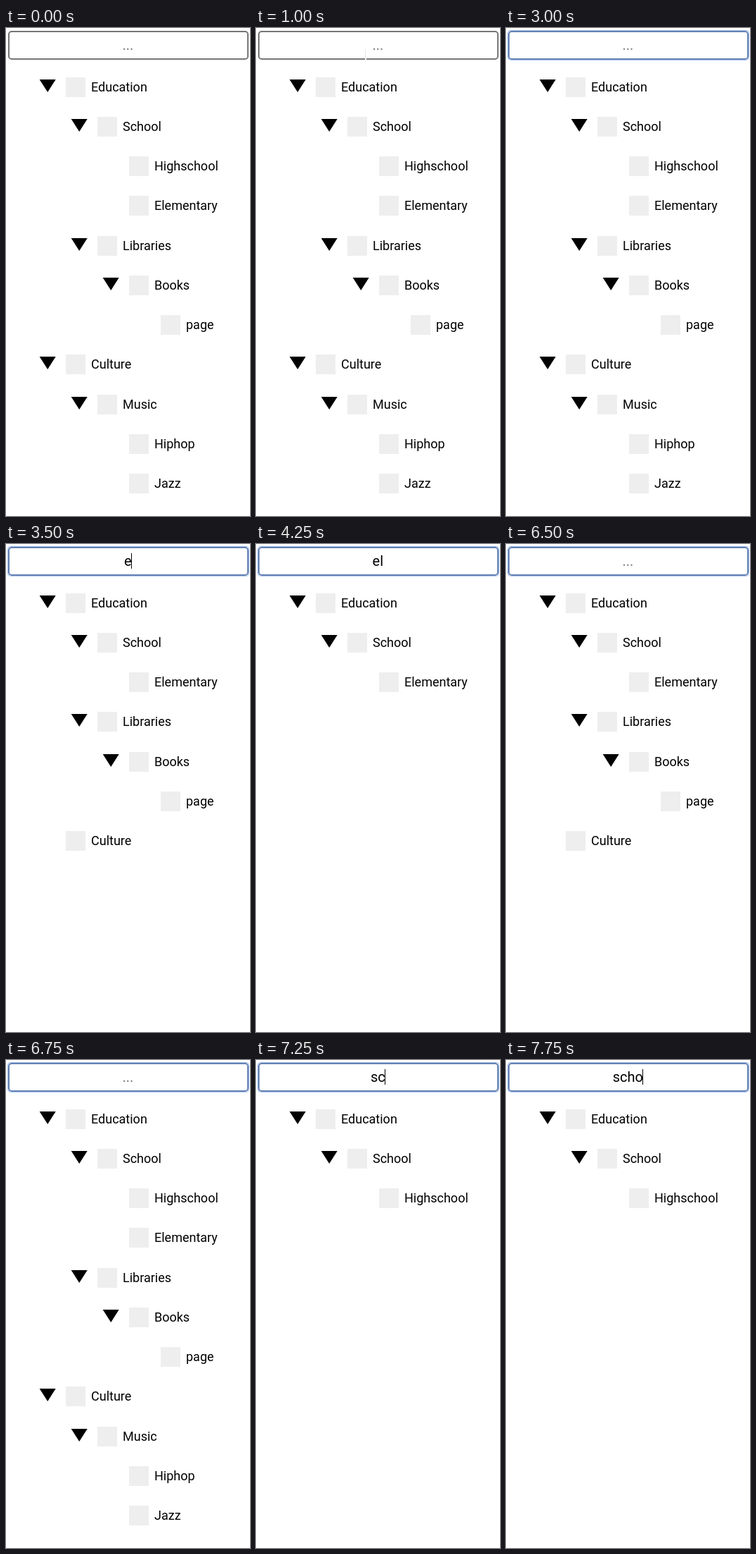
Animation of 347 by 692 pixels, one loop 8000 ms. Source, as an HTML page:

```html
<!DOCTYPE html>
<html lang="en">
<head>
<meta charset="utf-8">
<title>Filterable tree</title>
<style>
  html, body { margin: 0; width: 100%; height: 100%; overflow: hidden; background: #fff; }
  svg { display: block; width: 347px; height: 692px; font-family: Roboto, sans-serif; }
</style>
</head>
<body>
<svg id="stage" viewBox="0 0 347 692"></svg>
<script>
const LOOP = 8000, ROW = 56.25, TOP = 69.7, INDENT = 45, CENTER = 173.3;

// [label, depth], in document order
const tree = [
  ['Education', 0], ['School', 1], ['Highschool', 2], ['Elementary', 2],
  ['Libraries', 1], ['Books', 2], ['page', 3],
  ['Culture', 0], ['Music', 1], ['Hiphop', 2], ['Jazz', 2]
];

// The list may lag behind the typed text, so the filter is stored separately.
const steps = [
  { at: 0, text: '', filter: '' },
  { at: 1000, text: '', filter: '', pointer: true },
  { at: 1250, text: '', filter: '', focus: true, caret: true },
  { at: 1750, text: '', filter: '', focus: true },
  { at: 2500, text: '', filter: '', focus: true, caret: true },
  { at: 3000, text: '', filter: '', focus: true },
  { at: 3500, text: 'e', filter: 'e', focus: true, caret: true },
  { at: 3750, text: 'el', filter: 'e', focus: true, caret: true },
  { at: 4000, text: 'el', filter: 'el', focus: true, caret: true },
  { at: 4250, text: 'el', filter: 'el', focus: true },
  { at: 5000, text: 'e', filter: 'e', focus: true, caret: true },
  { at: 5500, text: 'e', filter: 'e', focus: true },
  { at: 6000, text: 'e', filter: 'e', focus: true, caret: true },
  { at: 6500, text: '', filter: 'e', focus: true },
  { at: 6750, text: '', filter: '', focus: true },
  { at: 7000, text: 's', filter: '', focus: true, caret: true },
  { at: 7250, text: 'sc', filter: 'sc', focus: true, caret: true },
  { at: 7500, text: 'sch', filter: 'sc', focus: true, caret: true },
  { at: 7750, text: 'scho', filter: 'scho', focus: true, caret: true }
];

const stage = document.getElementById('stage');

const rect = (x, y, w, h, fill) =>
  `<rect x="${x}" y="${y}" width="${w}" height="${h}" fill="${fill}"/>`;

const frame = (x, y, w, h, radius, color, width) =>
  `<rect x="${x}" y="${y}" width="${w}" height="${h}" rx="${radius}" fill="none" stroke="${color}" stroke-width="${width}"/>`;

// A node stays when it or any of its descendants matches.
function visibleNodes(filter) {
  return tree.filter(([label, depth], i) => {
    if (label.toLowerCase().includes(filter)) return true;
    for (let j = i + 1; j < tree.length && tree[j][1] > depth; j++)
      if (tree[j][0].toLowerCase().includes(filter)) return true;
    return false;
  });
}

function drawTree(filter) {
  const nodes = visibleNodes(filter);
  return nodes.map(([label, depth], i) => {
    const x = depth * INDENT, y = Math.round(TOP + i * ROW);
    const open = i + 1 < nodes.length && nodes[i + 1][1] > depth;
    return (open ? `<path d="M${x + 47.7} ${y + 3}h23l-11.5 18z"/>` : '') +
      rect(x + 85, y, 28, 28, '#eee') +
      `<text x="${x + 121}" y="${y + 20}" font-size="18">${label}</text>`;
  }).join('');
}

function drawInput({ text, focus, pointer }) {
  const border = focus
    ? frame(2.5, 3.5, 343, 42, 4, '#a5bfe8', 1) + frame(4, 5, 340, 39, 4, '#6482b4', 2)
    : frame(4, 5, 340, 39, 4, '#767676', 2);
  const beam = pointer ? rect(155, 29, 2, 19, '#fff') + rect(155, 30, 1, 17, '#e6e6e6') : '';
  return border + beam +
    `<text id="field" x="${CENTER}" y="31" font-size="20" text-anchor="middle" fill="${text ? '#000' : '#757575'}">${text || '...'}</text>`;
}

function draw(step) {
  stage.innerHTML = drawInput(step) + drawTree(step.filter);
  if (!step.caret) return;
  const width = document.getElementById('field').getComputedTextLength();
  const x = step.text ? Math.round(CENTER + width / 2 - 0.6) : 174;
  stage.insertAdjacentHTML('beforeend', rect(x, 13, 1, 22, '#000'));
}

let shown;
function tick() {
  const time = performance.now() % LOOP;
  const step = steps.findLast(s => s.at <= time);
  if (step !== shown) draw(shown = step);
  requestAnimationFrame(tick);
}
tick();
</script>
</body>
</html>
```
